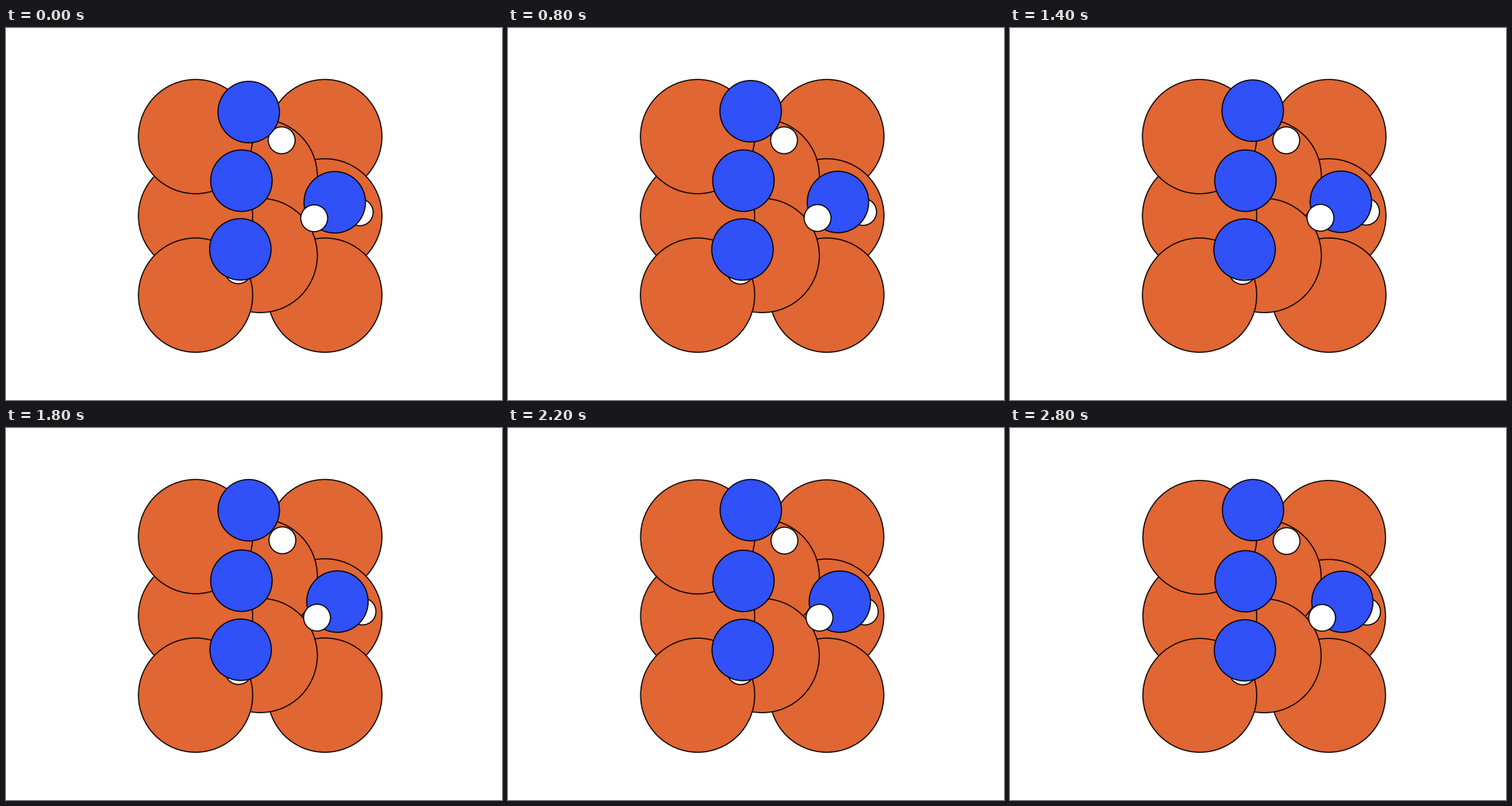
A matplotlib script that plays this animation: 640x480 px, repeating every 3000 ms.

```python
import matplotlib.pyplot as plt
from matplotlib.animation import FuncAnimation
from matplotlib.patches import Circle

W, H, DPI = 640, 480, 100
FRAMES, STEP = 15, 200

UNIT = 55.84                      # pixels per angstrom
FE = (1.32 * UNIT, "#e06633")
N = (0.71 * UNIT, "#3050f8")
HY = (0.31 * UNIT, "#ffffff")

MID_X, TOP, BOTTOM = 328.0, 66.4, 418.4
LEFT, RIGHT = 244.6, 411.4
ROW_0 = TOP + FE[0]
ROW_4 = BOTTOM - FE[0]
ROW_1, ROW_2, ROW_3 = (ROW_0 + (ROW_4 - ROW_0) * k / 4 for k in (1, 2, 3))


def fixed(kind, x, y):
    return kind, (x, 0, 0), (y, 0, 0)


TOP_N = (N, (313.15, -0.03, 0.004), (108.45, -0.262, 0))

# Back to front: kind, then x and y as (start, speed, bend) per step
ATOMS = [
    fixed(FE, RIGHT, ROW_0),
    fixed(FE, RIGHT, ROW_2),
    fixed(FE, RIGHT, ROW_4),
    fixed(FE, MID_X, ROW_1),
    fixed(FE, MID_X, ROW_3),
    fixed(FE, LEFT, ROW_2),
    fixed(FE, LEFT, ROW_0),
    fixed(FE, LEFT, ROW_4),
    (HY, (299.6, 0.04, 0), (312.6, 0.15, -0.005)),
    (HY, (456.4, 0.5, -0.011), (237.8, -0.14, 0.0025)),
    (HY, (355.7, 0.13, -0.003), (144.9, 0, 0)),
    TOP_N,
    fixed(N, 303.8, 197.0),
    (N, (302.4, 0.04, 0), (285.6, 0.06, 0)),
    (N, (424.2, 0.43, -0.005), (224.9, -0.1, 0)),
    (HY, (397.7, 0.45, -0.005), (245.5, -0.1, 0.001)),
]


def at(path, i):
    start, speed, bend = path
    return start + speed * i + bend * i * i


fig = plt.figure(figsize=(W / DPI, H / DPI), dpi=DPI, facecolor="white")
ax = fig.add_axes([0, 0, 1, 1])
ax.set_xlim(0, W)
ax.set_ylim(H, 0)
ax.axis("off")

discs = []
for z, ((radius, color), _, _) in enumerate(ATOMS):
    disc = Circle((0, 0), radius, facecolor=color, edgecolor="black",
                  linewidth=1, zorder=z + 1)
    discs.append(ax.add_patch(disc))


def draw(i):
    # The view shrinks to fit once the top nitrogen rises past the metal
    peak = min(TOP, at(TOP_N[2], i) - N[0])
    zoom = (BOTTOM - TOP) / (BOTTOM - peak)
    for disc, (kind, px, py) in zip(discs, ATOMS):
        disc.center = (MID_X + (at(px, i) - MID_X) * zoom,
                       BOTTOM + (at(py, i) - BOTTOM) * zoom)
        disc.set_radius(kind[0] * zoom)
    return discs


anim = FuncAnimation(fig, draw, frames=FRAMES, interval=STEP,
                     repeat=True, repeat_delay=0)
plt.show()
```
